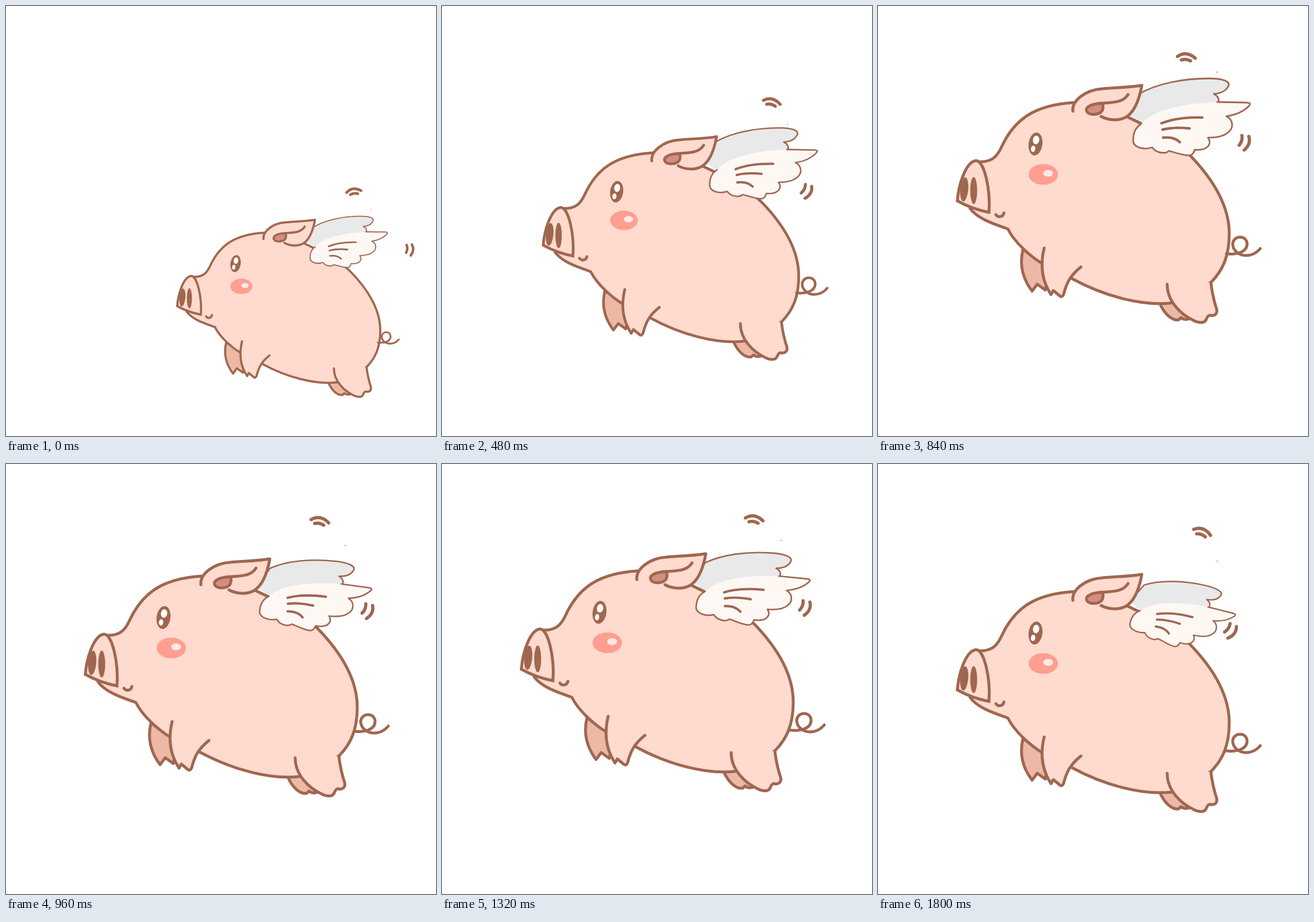
These frames come from a looping animation (748x748 px, 1870 ms). An HTML page:

```html
<!DOCTYPE html>
<html lang="en">
<head>
<meta charset="utf-8">
<title>Flying pig</title>
<style>
  html, body { margin: 0; width: 100%; height: 100%; overflow: hidden; background: #fff; }
  svg { display: block; width: 100%; height: 100%; }
  .line { fill: none; stroke: #9f6750; stroke-width: 5; stroke-linecap: round; stroke-linejoin: round; }
  .skin { fill: #ffdace; }
  .shade { fill: #edb8a6; }
  .inner { fill: #d48e80; }
  .brown { fill: #9f6750; }
  .white { fill: #fff; }
  .sharp { stroke-linejoin: miter; }
  .thin { stroke-width: 2.8; }
  .feather { stroke-width: 4.4; }
  .mark { stroke-width: 5.6; }
</style>
</head>
<body>
<svg viewBox="0 0 748 748">
  <g class="wing">
    <path fill="#e9e9e9" d="M435 189L454 153C485 135 530 126 575 126C600 126 612 131 610 138C607 146 598 152 584 153Q595 158 592 168L560 205L460 208Z"/>
    <path class="line thin" d="M435 189L454 153C485 135 530 126 575 126C600 126 612 131 610 138C607 146 598 152 584 153Q595 158 592 168"/>
  </g>

  <g class="body">
    <path class="line shade" d="M252 424C246 450 252 475 268 496L277 484L291 494L300 450Z"/>
    <path class="line shade" d="M490 517C498 535 510 547 523 546L527 542Q533 547 542 544L535 515Z"/>
    <path class="line skin" d="M178 271C200 271 208 260 215 245C238 195 275 172 340 168C375 170 410 181 434 193C470 211 510 228 541 258C585 303 611 350 611 396C611 435 600 460 579 481L515 516C460 524 390 503 337 474L284 447C265 435 238 412 226 388C205 380 175 372 160 352Z"/>
    <path class="line" d="M453 232Q460 240 471 238"/>
    <path class="line skin" d="M289 421C282 450 285 478 301 502L305 495L317 505Q321 507 323 501C328 482 334 469 353 454"/>
    <path class="line skin" d="M503 484C503 515 528 537 549 547C557 551 568 553 571 545Q574 538 577 538C586 540 591 535 589 527C584 512 581 498 579 481"/>

    <path class="line skin sharp" d="M138 339C140 312 152 272 170 269C185 268 196 320 193 359Q163 353 138 339Z"/>
    <ellipse class="brown" cx="150" cy="319" rx="7" ry="21" transform="rotate(5 150 319)"/>
    <ellipse class="brown" cx="166.5" cy="321" rx="6" ry="23.5"/>
    <path class="line" d="M205 363Q209 368 214 366Q218 365 219 360"/>

    <g transform="rotate(8 274 240)">
      <ellipse class="brown" cx="274" cy="240" rx="12" ry="20"/>
      <ellipse class="white" cx="274" cy="233" rx="5.5" ry="7.5"/>
      <ellipse class="white" cx="271" cy="249" rx="3.8" ry="5.5"/>
    </g>
    <ellipse fill="#ff9e91" cx="287.5" cy="293" rx="25.5" ry="18"/>
    <ellipse fill="#ffe9e4" cx="296" cy="291" rx="8.5" ry="6"/>

    <path class="line skin" d="M339 183C337 165 360 146 390 144C410 142 435 142 459 138C455 160 447 185 430 194C418 200 400 199 388 192"/>
    <path class="line inner" d="M390 169C371 170 360 176 363 183C367 191 385 190 390 182Q393 175 390 169"/>
    <path class="line" d="M435 154C425 170 405 167 385 170"/>
    <circle class="brown" cx="590" cy="115" r=".9"/>
  </g>

  <g class="tail">
    <path class="line" d="M606 431C624 433 642 428 642 414C642 398 618 398 617 414C617 425 628 434 640 434C652 434 660 428 665 422"/>
  </g>

  <g class="wing">
    <path fill="#fef8f5" d="M444 232C444 218 450 210 458 205C480 180 530 170 590 167L640 168Q650 168 646 173C638 182 625 189 606 192C618 197 619 212 610 219C603 226 590 229 574 229C582 240 573 252 551 250Q548 260 541 260C530 260 515 254 506 252C500 258 484 256 477 246C462 251 442 246 444 232Z"/>
    <path class="line thin" d="M590 167L640 168Q650 168 646 173C638 182 625 189 606 192C618 197 619 212 610 219C603 226 590 229 574 229C582 240 573 252 551 250Q548 260 541 260C530 260 515 254 506 252C500 258 484 256 477 246C462 251 442 246 444 232C444 218 450 210 458 205"/>
    <path class="line feather" d="M493 204Q520 193 564 194M495 215Q515 210 542 213M496 229Q515 227 525 237"/>
  </g>

  <g class="topMark"><path class="line mark" d="M517 84Q532 73 548 86M524 90Q532 87 540 91"/></g>
  <g class="sideMark"><path class="line mark" d="M636 218Q638 227 632 235M648 219Q653 232 641 243"/></g>
</svg>
<script>
  const LOOP = 1870, STEP = 30, LAST = 1800;
  const ARRIVE = 630, LOW = 1080, HALF = 360;

  // Each part is drawn at its highest pose. The other poses are relative to
  // that: shift and turn are added, size multiplies.
  const pose = (dx, dy, size = 1, turn = 0) => ({ dx, dy, size, turn });
  const home = pose(0, 0);
  const topLow = pose(31.5, 34, 1, 16), sideLow = pose(-28, 61, 1, 20);
  const parts = [
    { name: 'body', at: [137, 339], peak: 840,
      start: pose(160, 183, .747), land: pose(0, 44), low: pose(0, 54) },
    { name: 'tail', at: [629, 414], peak: 840, sag: 14,
      start: pose(32, 161, .62), land: pose(1, 41), low: pose(0, 54) },
    { name: 'wing', at: [444, 232], peak: 840,
      start: pose(85, 205, .665, -.6), land: pose(2, 38), low: pose(-5, 43, .862, 13) },
    { name: 'topMark', at: [532.5, 84.5], peak: 870,
      start: pose(72.5, 238, .82, -11), land: topLow, low: topLow },
    { name: 'sideMark', at: [642, 230], peak: 870,
      start: pose(61, 194, .77, -10), land: sideLow, low: sideLow }
  ];
  for (const part of parts) part.nodes = document.querySelectorAll('.' + part.name);

  const ramp = (t, from, to) => Math.max(0, Math.min(1, (t - from) / (to - from)));
  const mix = (a, b, u) => {
    const at = key => a[key] + (b[key] - a[key]) * u;
    return pose(at('dx'), at('dy'), at('size'), at('turn'));
  };

  // Fly in, rise to the peak, then bob between low and high.
  function poseAt({ start, land, low, peak }, t) {
    if (t < ARRIVE) return mix(start, land, t / ARRIVE);
    if (t < peak) return mix(land, home, ramp(t, ARRIVE, peak));
    if (t < LOW) return mix(home, low, ramp(t, peak, LOW));
    return mix(home, low, Math.abs(1 - (t - LOW) / HALF));
  }

  function draw(t) {
    for (const part of parts) {
      const [x, y] = part.at, p = poseAt(part, t);
      const sag = (part.sag || 0) * ramp(t, part.peak, LOW);
      const move = `translate(${x + p.dx} ${y + p.dy + sag}) rotate(${p.turn}) scale(${p.size}) translate(${-x} ${-y})`;
      part.nodes.forEach(node => node.setAttribute('transform', move));
    }
  }

  const begin = performance.now();
  function tick() {
    const t = (performance.now() - begin) % LOOP;
    draw(Math.min(LAST, Math.floor(t / STEP) * STEP));
    requestAnimationFrame(tick);
  }
  tick();
</script>
</body>
</html>
```
